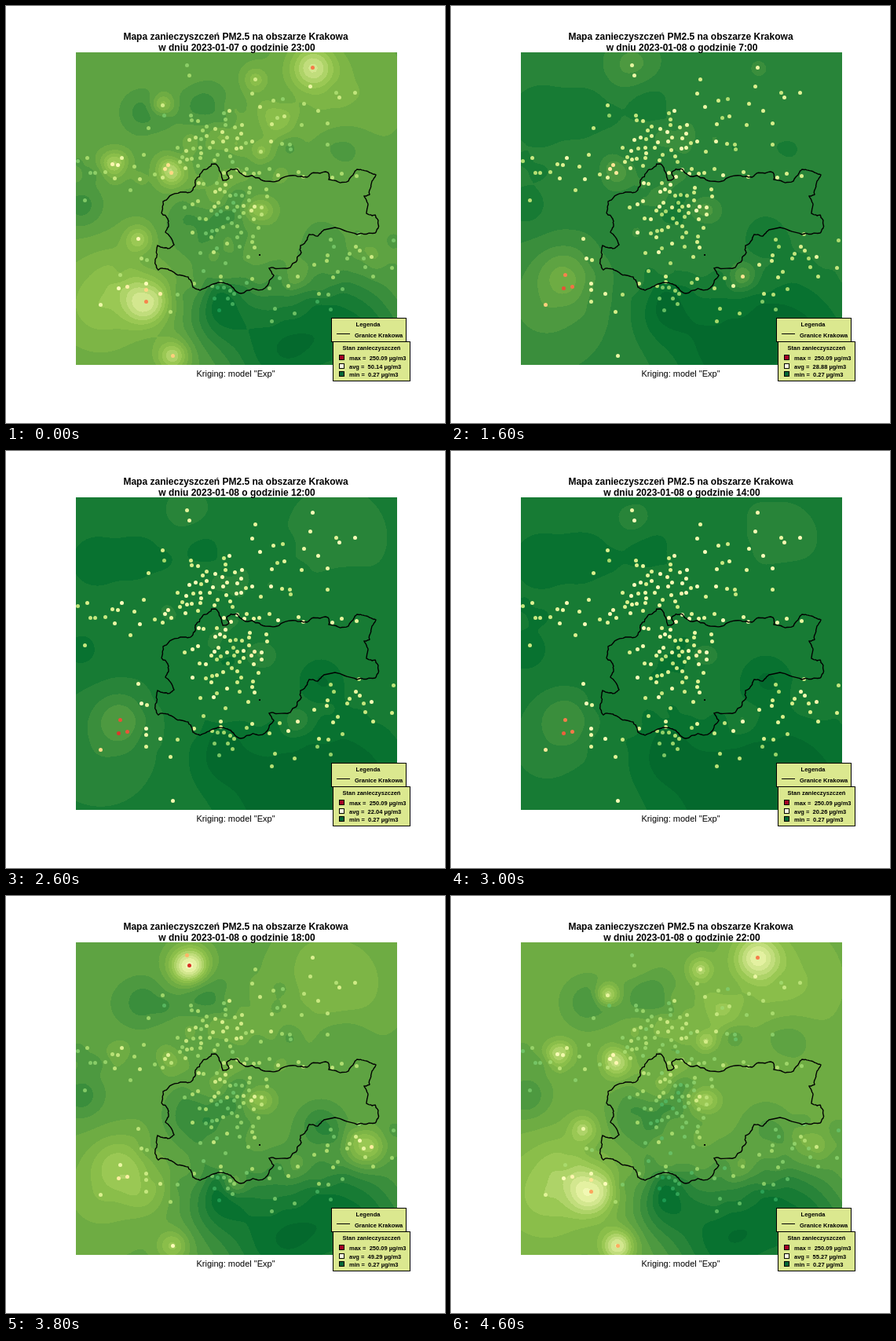
Recreate the animation shown at these times as an HTML page with a canvas. Size 559 by 531 pixels, loop 4800 ms.

```html
<!DOCTYPE html>
<html lang="pl">
<head>
<meta charset="utf-8">
<title>Mapa zanieczyszczeń PM2.5</title>
<style>
html, body { margin: 0; width: 559px; height: 531px; overflow: hidden; background: #fff; }
canvas { display: block; }
</style>
</head>
<body>
<canvas id="stage" width="559" height="531"></canvas>
<script>
const ctx = document.getElementById('stage').getContext('2d');
const MAP = { x: 89, y: 59, w: 409, h: 398 };
const STEP = 200, HOURS = 24, CELL = 4;
const COLS = Math.ceil(MAP.w / CELL) + 2, ROWS = Math.ceil(MAP.h / CELL) + 2;

// Daily course of the average: [hours since the start, µg/m3]
const course = [[0, 50.14], [3, 37.63], [8, 28.88], [11, 23.81], [15, 20.26], [19, 49.29], [23, 55.27]];

// Lasting deviations from the average: x, y, radius, gain
const terrain = [
  [350, 440, 75, -.75], [430, 385, 65, -.4], [470, 440, 60, -.4], [272, 390, 40, -.5],
  [95, 255, 28, -.3], [175, 135, 28, -.3], [250, 125, 32, -.3], [430, 180, 32, -.2], [326, 260, 15, .5]
];

// Passing ones: x, y, radius, gain, hour of the peak, duration
const episodes = [
  [178, 376, 27, .9, 0, 5], [145, 342, 34, .85, 12, 9], [120, 380, 70, .45, 5, 14],
  [135, 201, 16, .6, 0, 4], [210, 212, 18, .9, 3, 7], [115, 140, 60, -.3, 11, 6],
  [233, 88, 23, 1.4, 18.5, 3], [230, 75, 30, .5, 9, 5], [390, 78, 28, .75, 23.5, 2.5],
  [420, 110, 75, .35, 18, 8], [317, 93, 15, .5, 23, 2], [199, 126, 14, .7, 23, 2],
  [324, 185, 12, .5, 23, 2], [168, 296, 17, .5, 0, 3], [345, 142, 22, .5, 1, 4],
  [240, 282, 35, -.45, 21, 5], [400, 290, 26, -.5, 14, 8], [371, 344, 18, .75, 9, 8],
  [455, 321, 24, .75, 19, 4], [212, 445, 20, .85, 22, 4], [290, 366, 16, .5, 19, 2]
];

// Groups of stations: centre, half size, count
const groups = [
  [255, 175, 75, 40, 45], [285, 252, 65, 58, 54], [280, 345, 80, 60, 28], [155, 215, 75, 40, 16],
  [172, 355, 35, 45, 7], [440, 325, 60, 45, 18], [345, 150, 110, 85, 24], [380, 390, 60, 25, 7], [400, 214, 70, 15, 6]
];

const border = [198,264, 200,249, 222,237, 238,234, 241,222, 251,209, 262,201, 267,201, 276,222, 284,219, 281,212,
  295,208, 305,217, 330,223, 362,216, 383,218, 389,213, 410,212, 411,221, 436,223, 447,208, 463,212, 471,215,
  466,223, 463,240, 456,242, 461,253, 459,264, 470,266, 474,278, 470,289, 447,291, 405,285, 397,293, 386,291,
  375,305, 376,314, 362,333, 335,334, 341,343, 330,359, 299,366, 282,354, 268,353, 247,362, 238,358, 232,345,
  210,337, 194,336, 190,323, 193,305, 206,309, 214,304, 203,288, 207,274];

const rgb = hex => [1, 3, 5].map(i => parseInt(hex.slice(i, i + 2), 16));
const lerp = (a, b, t) => a + (b - a) * t;
const clamp = (v, lo, hi) => Math.max(lo, Math.min(hi, v));
const bell = d => Math.exp(-d * d);
const mix = (stops, t) => {
  const p = clamp(t, 0, 1) * (stops.length - 1), i = Math.min(Math.floor(p), stops.length - 2);
  return stops[i].map((c, n) => Math.round(lerp(c, stops[i + 1][n], p - i)));
};
let seed = 11;
const random = () => (seed = seed * 16807 % 2147483647) / 2147483647;
const spread = r => (random() + random() - 1) * r;

const dotRamp = ['#006837', '#1a9850', '#66bd63', '#a6d96a', '#d9ef8b', '#ffffbf', '#fee08b', '#fdae61', '#f46d43',
  '#d73027', '#a50026'].map(rgb);
const fieldRamp = ['#00602a', '#087330', '#2c863a', '#549d41', '#76b144', '#92c44d', '#bddb77', '#e2f09f', '#ffffc4'].map(rgb);
const bands = Array.from({ length: 18 }, (_, i) => mix(fieldRamp, i / 17));

const stations = [];
function addStation(x, y, gap) {
  x = Math.round(x);
  y = Math.round(y);
  if (stations.some(s => Math.hypot(s.x - x, s.y - y) < gap)) return false;
  return stations.push({ x, y, noise: spread(.8) });
}
episodes.forEach(([x, y, , gain]) => gain > 0 && addStation(x, y, 1));
for (const [cx, cy, rx, ry, count] of groups)
  for (let n = 0, tries = 0; n < count && tries < 400; tries++)
    if (addStation(cx + spread(rx), cy + spread(ry), 6)) n++;

const makeGrid = value => Float32Array.from({ length: COLS * ROWS },
  (_, i) => value(MAP.x + i % COLS * CELL, MAP.y + Math.floor(i / COLS) * CELL));
const sum = (spots, x, y) => spots.reduce((s, [sx, sy, r, gain]) => s + gain * bell(Math.hypot(x - sx, y - sy) / r), 0);

// Every station also bends the contours a little
const ripples = stations.map(s => [s.x, s.y, 13, s.noise * .2]);
const relief = makeGrid((x, y) => sum(terrain, x, y) + sum(ripples, x, y));

function deviation(hour) {
  const active = episodes.map(([x, y, r, gain, peak, duration]) => {
    const gap = Math.abs(hour - peak);
    return [x, y, r, gain * bell(Math.min(gap, HOURS - gap) / duration)];
  });
  return makeGrid((x, y) => sum(active, x, y)).map((v, i) => v + relief[i]);
}
function sample(grid, x, y) {
  const c = Math.floor(x / CELL), r = Math.floor(y / CELL), u = x / CELL - c, v = y / CELL - r, i = r * COLS + c;
  return lerp(lerp(grid[i], grid[i + 1], u), lerp(grid[i + COLS], grid[i + COLS + 1], u), v);
}
function average(hour) {
  const n = Math.min(course.findLastIndex(p => p[0] <= hour), course.length - 2);
  const [[h0, v0], [h1, v1]] = course.slice(n, n + 2);
  return lerp(v0, v1, (hour - h0) / (h1 - h0));
}

// Rugged outline: midpoints are displaced again and again
const outline = new Path2D();
function rugged(x0, y0, x1, y1, depth) {
  if (!depth) return outline.lineTo(x1, y1);
  const sway = Math.hypot(x1 - x0, y1 - y0) * .2;
  const x = (x0 + x1) / 2 + spread(sway), y = (y0 + y1) / 2 + spread(sway);
  rugged(x0, y0, x, y, depth - 1);
  rugged(x, y, x1, y1, depth - 1);
}
outline.moveTo(border[0], border[1]);
for (let i = 0, n = border.length; i < n; i += 2)
  rugged(border[i], border[i + 1], border[(i + 2) % n], border[(i + 3) % n], 3);

function text(str, x, y, font, align = 'center') {
  ctx.font = font + ' "Liberation Sans", Arial, sans-serif';
  ctx.textAlign = align;
  ctx.fillStyle = '#000';
  ctx.fillText(str, x, y);
}
function box(x, y, w, h, fill) {
  ctx.fillStyle = fill;
  ctx.fillRect(x, y, w, h);
  ctx.lineWidth = 1;
  ctx.strokeRect(x + .5, y + .5, w, h);
}

const image = ctx.createImageData(MAP.w, MAP.h);
function drawField(grid, mean) {
  for (let y = 0, i = 0; y < MAP.h; y++)
    for (let x = 0; x < MAP.w; x++, i += 4) {
      const level = Math.round(mean * (1 + sample(grid, x, y)));
      image.data.set(bands[clamp(level, 0, 17)], i);
      image.data[i + 3] = 255;
    }
  ctx.putImageData(image, MAP.x, MAP.y);
}

function drawStations(grid, avg) {
  for (const { x, y, noise } of stations) {
    const v = sample(grid, clamp(x - MAP.x, 0, MAP.w), clamp(y - MAP.y, 0, MAP.h));
    const grade = 5.3 - avg * .045 + 2 * v + 5 * Math.max(0, v - .4) + noise;
    ctx.fillStyle = `rgb(${mix(dotRamp, clamp(grade, 1, 9) / 10)})`;
    ctx.beginPath();
    ctx.arc(x + .5, y + .5, 2.5, 0, 7);
    ctx.fill();
  }
}

function drawLegend(avg) {
  const bold = 'bold 7.5px', fill = '#dbe88f';
  box(414, 397, 95, 30, fill);
  text('Legenda', 461, 408, bold);
  ctx.fillRect(421, 417, 17, 1);
  text('Granice Krakowa', 444, 422, bold, 'left');
  box(416, 427, 98, 50, fill);
  text('Stan zanieczyszczeń', 465.5, 438, bold);
  [['max', 250.09, '#a50026'], ['avg', avg, '#ffffe0'], ['min', .27, '#006837']].forEach(([name, value, color], i) => {
    const y = 444 + i * 10.5;
    box(424, Math.round(y), 6, 6, color);
    text(`${name} =  ${value.toFixed(2)} µg/m3`, 437, y + 7, bold, 'left');
  });
}

function draw(hour) {
  const avg = average(hour), grid = deviation(hour);
  ctx.fillStyle = '#fff';
  ctx.fillRect(0, 0, 559, 531);
  drawField(grid, avg / 7);
  drawStations(grid, avg);
  ctx.strokeStyle = '#000';
  ctx.lineWidth = 1.4;
  ctx.stroke(outline);
  ctx.fillStyle = '#000';
  ctx.fillRect(322, 316, 2, 2);

  text('Mapa zanieczyszczeń PM2.5 na obszarze Krakowa', 292.5, 43, 'bold 12px');
  text(`w dniu 2023-01-0${hour ? 8 : 7} o godzinie ${(hour + 23) % 24}:00`, 294, 57, 'bold 12px');
  text('Kriging: model "Exp"', 292.5, 472, '11px');
  drawLegend(avg);
}

let start, shown;
function tick(now) {
  start ??= now;
  const hour = Math.floor((now - start) / STEP) % HOURS;
  if (hour !== shown) draw(shown = hour);
  requestAnimationFrame(tick);
}
draw(shown = 0);
requestAnimationFrame(tick);
</script>
</body>
</html>
```
